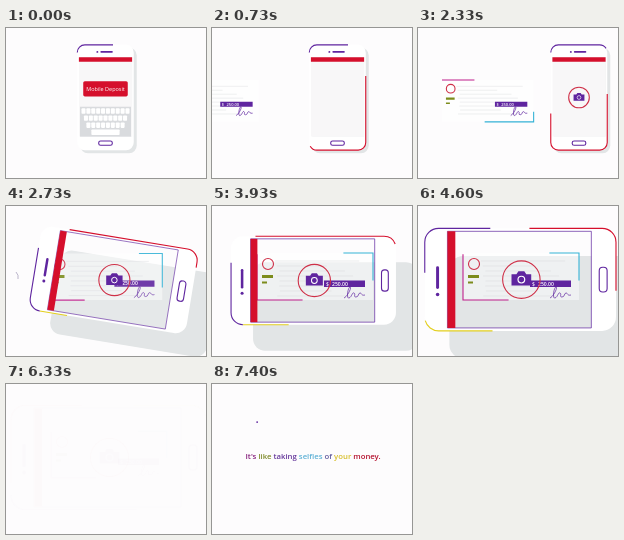
An HTML page that plays this animation: 200x150 px, repeating every 7470 ms.

```html
<!DOCTYPE html>
<html lang="en">
<head>
<meta charset="utf-8">
<title>Mobile deposit</title>
<style>
  html, body { margin: 0; width: 100%; height: 100%; overflow: hidden; background: #fdfcfd; }
  svg { display: block; width: 100vw; height: 100vh; }
  text { font-family: "Open Sans", "Noto Sans", sans-serif; }
  .line { fill: none; vector-effect: non-scaling-stroke; stroke-width: 1.1; }
  .thin { stroke-width: .7; }
  .purple { stroke: #5f259f; }
  .red { stroke: #cf3048; }
</style>
</head>
<body>
<svg viewBox="0 0 200 150">
  <rect id="shadow" x="-52" y="-97" width="104" height="194" rx="14" fill="#e2e5e6"/>

  <g id="check">
    <path id="paper" fill="#fff" fill-opacity=".45"/>
    <g id="print" stroke="#dcdde0" stroke-width=".6"></g>
    <circle class="line red" cx="11" cy="11" r="5.5"/>
    <path d="M5 22h11v3H5zM5 28.500h5v2H5z" fill="#7c8c1c"/>
    <path d="M67 27.500h41v6.500H67z" fill="#5f259f"/>
    <text y="32.600" font-size="5.100" font-weight="600" fill="#fff"><tspan x="69">$</tspan><tspan x="75">250.00</tspan></text>
    <path class="line purple thin" d="M87 45c4-2 8-11 6-11s-4 12-1 11 3-6 5-5-1 4 2 4 2-4 4-4 1 3 5 2"/>
    <g id="checkEdges"></g>
  </g>

  <g id="phone">
    <rect id="screen" x="-49" y="-74" width="98" height="146" fill="#f8f7f8"/>
    <path fill="#fff" fill-rule="evenodd" d="M-38-97H38A14 14 0 0 1 52-83V83A14 14 0 0 1 38 97H-38A14 14 0 0 1-52 83V-83A14 14 0 0 1-38-97ZM-49-74V72H49V-74Z"/>
    <path id="bezel" class="line purple thin" d="M-49-74V72H49V-74Z"/>
    <path d="M-49-74H49V-66H-49Z" fill="#d50f2c"/>
    <path d="M-8-84H12" stroke="#5f259f" stroke-width="3" stroke-linecap="round"/>
    <circle cx="-15" cy="-84" r="1.800" fill="#5f259f"/>
    <rect class="line purple" x="-12.500" y="80" width="25" height="8" rx="3.500"/>
    <g id="form">
      <rect x="-41" y="-30" width="82" height="28" rx="3" fill="#d50f2c"/>
      <text y="-12.400" font-size="10.100" text-anchor="middle" fill="#fff">Mobile Deposit</text>
      <rect x="-47" y="17" width="94" height="55" fill="#d9dbde"/>
      <g id="keys" fill="#fff"></g>
    </g>
    <g id="phoneEdges"></g>
    <g id="camera">
      <circle class="line red" r="19"/>
      <path d="M-10-5.500H-5L-3-8.500H3L5-5.500H10V6H-10Z" fill="#5f259f"/>
      <circle r="3.400" fill="none" stroke="#fff" stroke-width="1.200"/>
    </g>
  </g>

  <path id="spark" d="M10 66q3 3 2 7" fill="none" stroke="#a9a3bd" stroke-width=".8"/>
  <text id="slogan" x="101" y="75" font-size="7.750" font-weight="600" text-anchor="middle"></text>
  <g id="dots"></g>
</svg>
<script>
const LOOP = 7470;
const $ = id => document.getElementById(id);
const clamp = v => Math.max(0, Math.min(1, v));
const ease = p => p < .5 ? 4 * p ** 3 : 1 - (2 - 2 * p) ** 3 / 2;
const ramp = (t, from, to) => ease(clamp((t - from) / (to - from)));
const mix = (a, b, p) => a + (b - a) * p;
const during = (t, from, to) => t > from && t < to ? 1 : 0;

let seed = 7;
const random = () => (seed = seed * 16807 % 2147483647) / 2147483647;

function set(el, attrs) {
  for (const key in attrs) el.setAttribute(key, attrs[key]);
  return el;
}

function add(parent, tag, attrs, text = '') {
  const el = set(document.createElementNS('http://www.w3.org/2000/svg', tag), attrs);
  el.textContent = text;
  return parent.appendChild(el);
}

function place(el, x, y, scale, rotation = 0) {
  set(el, { transform: `translate(${x} ${y}) rotate(${rotation}) scale(${scale})` });
}

// A colored stretch of a perimeter; start and length are fractions of a lap.
function addEdge(parent, stroke, d = '') {
  const el = add(parent, 'path', { class: 'line', stroke, d, pathLength: 1 });
  return (start, length) => set(el, {
    'stroke-dasharray': `${length} ${1 - length}`,
    'stroke-dashoffset': -(start % 1)
  });
}

const rim = 'M-52-83A14 14 0 0 1-38-97H38A14 14 0 0 1 52-83V83A14 14 0 0 1 38 97H-38A14 14 0 0 1-52 83Z';
const [yellowEdge, purpleEdge, redEdge] =
  ['#e3cf1f', '#5f259f', '#d50f2c'].map(color => addEdge($('phoneEdges'), color, rim));
const [pinkEdge, cyanEdge] = ['#c01f8c', '#35b3d6'].map(color => addEdge($('checkEdges'), color));

for (let row = 0; row < 4; row++) {
  const count = row < 3 ? 10 - row : 1;
  const width = row < 3 ? 7.4 : 52;
  for (let i = 0; i < count; i++)
    add($('keys'), 'rect', { x: (i - (count - 1) / 2) * 9 - width / 2, y: 20 + row * 13, width, height: 10, rx: 1.5 });
}

for (let y = 8; y < 46; y += 5) {
  const x = 18 + random() * 6;
  add($('print'), 'path', { d: `M${x} ${y}h${40 + random() * 48}` });
}

const words = Object.entries({
  "It's": '#86207c', like: '#7f8a2a', taking: '#65379b', selfies: '#5eb1d6',
  of: '#615b9e', your: '#d7bf2c', 'money.': '#b5122f'
}).map(([word, fill], i) => add($('slogan'), 'tspan', { fill }, (i ? ' ' : '') + word));

const addDot = fill => add($('dots'), 'circle', { r: .9, fill });
const runners = ['#5f259f', '#3d5fc0'].map(addDot);
const flecks = ['#5f259f', '#d50f2c', '#35b3d6', '#e3cf1f', '#c01f8c'].map((fill, i) => ({
  el: addDot(fill),
  x: i ? 25 + random() * 165 : 45,
  y: i % 2 ? 118 - random() * 10 : 38 - i * 3,
  end: LOOP - i * 140
}));

function draw(t) {
  const slide = ramp(t, 400, 1100);
  const turn = ramp(t, 2400, 2870);
  const zoom = ramp(t, 3950, 4900);
  const fade = 1 - ramp(t, 5850, 6400);

  const x = mix(mix(99.5, 161, slide), 101.5, turn) + zoom;
  const y = mix(69.5, 74.5, turn) - zoom;
  const scale = mix(.543, .85, turn) + .155 * zoom;
  const rotation = -90 * turn;
  place($('phone'), x, y, scale, rotation);
  place($('shadow'), x + 3 + 19 * turn + 3 * zoom, y + 3 + 23 * turn + 2 * zoom, scale, rotation);
  place($('camera'), 0, turn, ramp(t, 800, 1150), -rotation);
  for (const id of ['shadow', 'phone', 'check']) set($(id), { opacity: fade });
  set($('form'), { opacity: 1 - ramp(t, 300, 550) });
  set($('screen'), { opacity: 1 - turn });
  set($('bezel'), { opacity: turn });
  set($('spark'), { opacity: during(t, 2600, 2870) });

  // Both perimeters are lapped once while sliding and once more after the zoom.
  const lap = ramp(t, 500, 2650), finalLap = ramp(t, 4030, 5600);
  const lead = .9 + 1.05 * lap + .86 * finalLap;
  yellowEdge(.73 + 1.04 * lap + .63 * finalLap, .14);
  purpleEdge(lead, .17 + .06 * finalLap);
  redEdge(lead + .25, .25 * ramp(t, 100, 1000));

  const height = mix(53, 47, turn);
  const sheet = `M0 0H116V${height}H0Z`;
  place($('check'), mix(mix(-95, 24, slide), 45, turn), mix(52, 47, turn), mix(.79, 1, turn));
  for (const el of [$('paper'), ...$('checkEdges').children]) set(el, { d: sheet });
  const drawn = ramp(t, 700, 1300), drift = .1 * (1 - turn);
  pinkEdge(.716 + drift, .28 * drawn);
  cyanEdge(.265 + drift, .175 * drawn);

  words.forEach((el, i) => set(el, { 'fill-opacity': ramp(t, 6380 + i * 60, 6650 + i * 60) }));
  for (const dot of flecks) {
    const p = 1 - (1 - clamp((t - 6400) / (dot.end - 6400))) ** 2;
    set(dot.el, { cx: mix(101, dot.x, .4 + .6 * p), cy: mix(72, dot.y, .4 + .6 * p), opacity: during(t, 6420, dot.end) });
  }
  const run = clamp((t - 1000) / 800);
  const opacity = during(run, 0, 1);
  set(runners[0], { cx: mix(26, 74, run), cy: 48, opacity });
  set(runners[1], { cx: mix(115, 111, run), cy: 95, opacity });
}

const began = performance.now();
function tick() {
  draw((performance.now() - began) % LOOP);
  requestAnimationFrame(tick);
}
tick();
</script>
</body>
</html>
```
